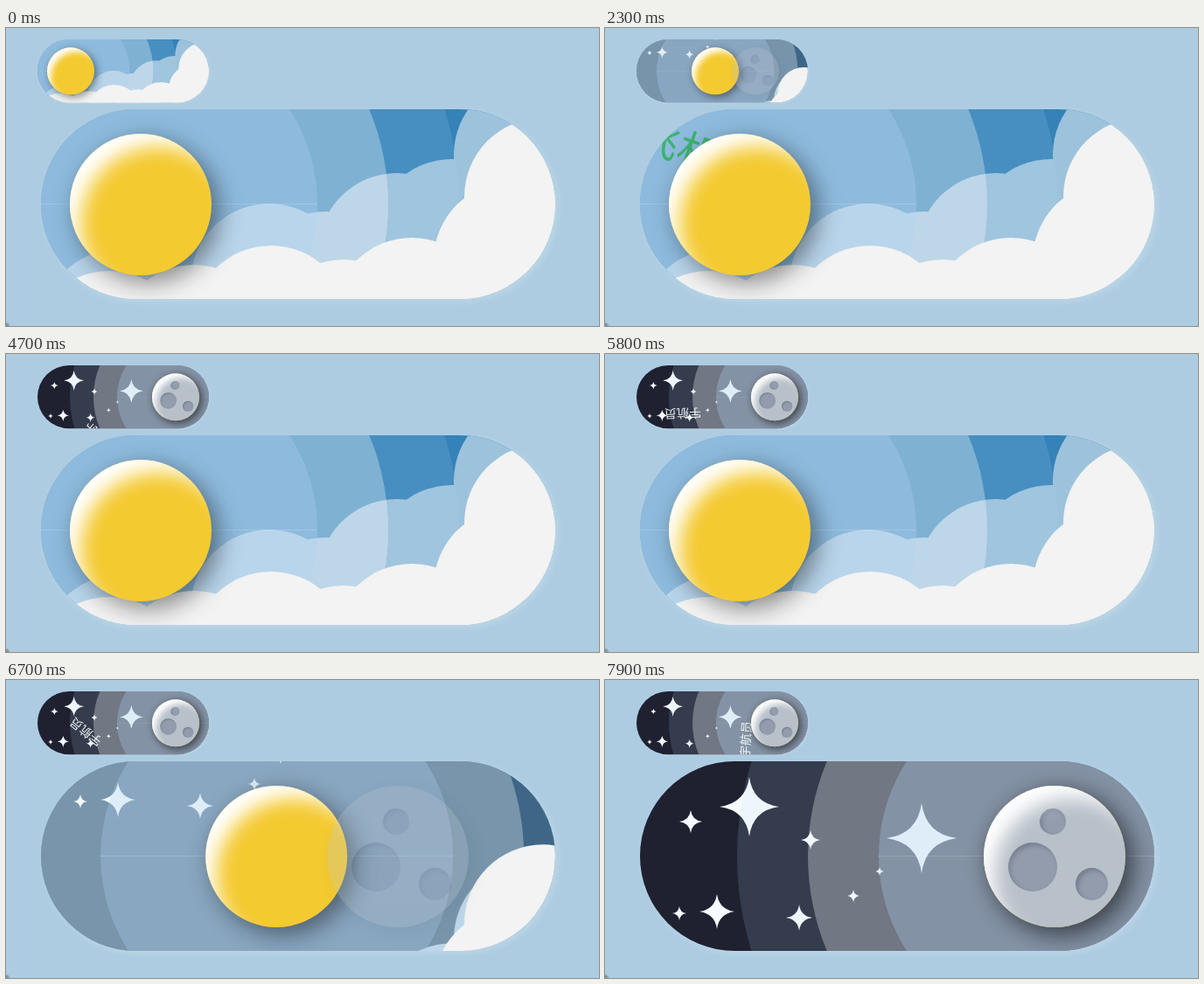
An HTML page that plays this animation: 678x341 px, repeating every 8000 ms.

```html
<!DOCTYPE html>
<html lang="zh">
<head>
<meta charset="utf-8">
<style>
html, body { margin: 0; width: 100%; height: 100%; overflow: hidden; }
body { position: relative; background: radial-gradient(circle at 0 100%, #7f8d99 2px, #adcce1 5px); }
.toggle {
  position: absolute; width: 588px; height: 217px; border-radius: 109px;
  overflow: hidden; transform-origin: 0 0;
  box-shadow: 3px 3px 9px rgba(255, 255, 255, .2);
}
.toggle * { position: absolute; }
svg { left: 0; top: 0; width: 588px; height: 217px; overflow: visible; }
.rear { fill: #9dc2dc; }
.front { fill: #f2f3f2; }
.stars { fill: #f8fbfd; }
.halo, .crater { border-radius: 50%; }
.seam { left: -88px; top: 108px; width: 404px; height: 1px; background: rgba(255, 255, 255, .18); }
.ball, .shade, .moon { width: 162px; height: 162px; border-radius: 50%; }
.ball { left: 33px; top: 28px; background: #f4ca31; box-shadow: 8px 8px 28px rgba(0, 0, 0, .45); }
.moon { background: #b8c0c9; box-shadow: 6px 6px 24px rgba(0, 0, 0, .2); }
.shade { box-shadow: inset 20px 22px 22px -8px #fff; }
.crater { background: #929cad; box-shadow: inset 3px 3px 5px rgba(60, 70, 90, .35); }
.label {
  left: 0; top: 0; line-height: 1; white-space: nowrap; font-weight: 500;
  font-family: "Noto Sans CJK SC", "Noto Sans CJK", sans-serif;
}
</style>
</head>
<body>
<script>
const LOOP = 8000, PUFF = 90, TRAVEL = 360;
// crests of the cloud puffs: x, y
const rearCrests = [[90, 160], [261, 108], [325, 117], [407, 73], [470, 57], [562, -38]];
const frontCrests = [[78, 185], [175, 178], [263, 156], [346, 172], [424, 147], [539, 83], [574, 10]];
// x, y, half size; the first three twinkle
const stars = [[182, 179, 15], [58, 69, 13], [195, 90, 11], [125, 52, 34], [88, 172, 20],
  [45, 174, 8], [322, 88, 40], [244, 154, 7], [274, 126, 5]];
const craters = [[79, 41, 15], [56, 93, 28], [123, 112, 18.5]];
const haloColors = ['rgba(173,216,230,.15)', 'rgba(255,255,255,.3)', 'rgba(175,210,240,.3)'];

const clamp = v => Math.max(0, Math.min(1, v));

// cubic-bezier(.42, 0, .58, 1)
function easeInOut(x) {
  let lo = 0, hi = 1, s = .5;
  for (let i = 0; i < 20; i++) {
    s = (lo + hi) / 2;
    const at = 1.26 * (1 - s) ** 2 * s + 1.74 * (1 - s) * s * s + s ** 3;
    if (at < x) lo = s; else hi = s;
  }
  return s * s * (3 - 2 * s);
}

const clouds = (name, crests, left, top) => `<svg class="${name}">` +
  crests.map(([x, y]) => `<circle cx="${x}" cy="${y + PUFF}" r="${PUFF}"/>`).join('') +
  `<rect x="${left}" y="${top}" width="600" height="300"/></svg>`;

const disc = (name, x, y, r, color = '') =>
  `<div class="${name}" style="left:${x - r}px;top:${y - r}px;width:${2 * r}px;height:${2 * r}px;background:${color}"></div>`;

function makeToggle(x, y, scale, start, early, text, textStyle) {
  const el = document.createElement('div');
  el.className = 'toggle';
  el.style.cssText = `left:${x}px;top:${y}px;transform:scale(${scale})`;
  const star = '<path d="M0-1Q.12-.12 1 0Q.12.12 0 1Q-.12.12-1 0Q-.12-.12 0-1"/>';
  el.innerHTML =
    clouds('rear', rearCrests, 200, 172) +
    `<svg class="stars">${star.repeat(stars.length)}</svg>` +
    `<div class="halos">${haloColors.map((c, i) => disc('halo', 114, 108.5, 363.5 - 81 * i, c)).join('')}` +
    '<div class="seam"></div></div>' +
    `<div class="label" style="${textStyle}">${text}</div>` +
    clouds('front', frontCrests, 0, 202) +
    `<div class="ball"><div class="moon">${craters.map(c => disc('crater', ...c)).join('')}</div>` +
    '<div class="shade"></div></div>';
  document.body.append(el);
  const part = { el, start, early, starPaths: el.querySelectorAll('path') };
  for (const name of ['rear', 'stars', 'halos', 'label', 'front', 'ball', 'moon'])
    part[name] = el.querySelector('.' + name);
  return part;
}

// each twinkling star shrinks to nothing and back once per 4.5 s
function twinkle(i, t) {
  if (i > 2) return 1;
  const phase = (t - 3000 - 200 * i + 2 * 4500) % 4500;
  return clamp(Math.min(phase, 4500 - phase) / 280);
}

function drawToggle(g, t) {
  const p = easeInOut(clamp((t - g.start) / 685));
  const dusk = clamp((t - g.start) / 920) ** .667;
  const mix = (a, b) => Math.round(a + (b - a) * dusk);
  const move = (el, x, y) => el.style.transform = `translate(${x}px,${y}px)`;
  g.el.style.background = `rgb(${mix(53, 31)},${mix(130, 33)},${mix(184, 49)})`;
  move(g.ball, TRAVEL * p, 0);
  move(g.halos, TRAVEL * p, 0);
  move(g.rear, 0, 351 * p);
  move(g.front, 0, 198 * p);
  move(g.stars, 0, -225 * (1 - p));
  move(g.moon, 244 * (1 - p), 0);
  g.moon.style.opacity = clamp((p - .3) / .5);
  stars.forEach(([x, y, r], i) => g.starPaths[i].setAttribute('transform',
    `translate(${x} ${y}) scale(${r * twinkle(i, t + g.early)})`));
}

function placeLabel(el, x, y, turn, shown) {
  el.style.transform = `translate(${x}px,${y}px) translate(-50%,-50%) rotate(${turn}deg)`;
  el.style.visibility = shown ? 'visible' : 'hidden';
}

const small = makeToggle(36, 13, 1 / 3, 1985, 0, '宇航员', 'color:#f4f8f8;font-size:42px');
const large = makeToggle(40, 93, 1, 6386, 300, '飞机', 'color:#3cb371;font-size:48px');

function draw(now) {
  const t = now % LOOP;
  drawToggle(small, t);
  drawToggle(large, t);

  const flown = (1 - Math.cos(Math.PI * clamp((t + 250) / 3200))) / 2;
  const dx = 552 * (.525 - flown);
  placeLabel(large.label, 253.5, 84, 20, t < 3050);
  large.label.style.translate = `${dx}px ${dx * .215}px`;

  const s = (t - 4700) / 3200;
  placeLabel(small.label, 159 + 213 * s ** 8, 252 - 330 * s + 243 * s * s, 210 + (t - 6500) * .045, t > 4600);
  requestAnimationFrame(draw);
}
draw(0);
</script>
</body>
</html>
```
